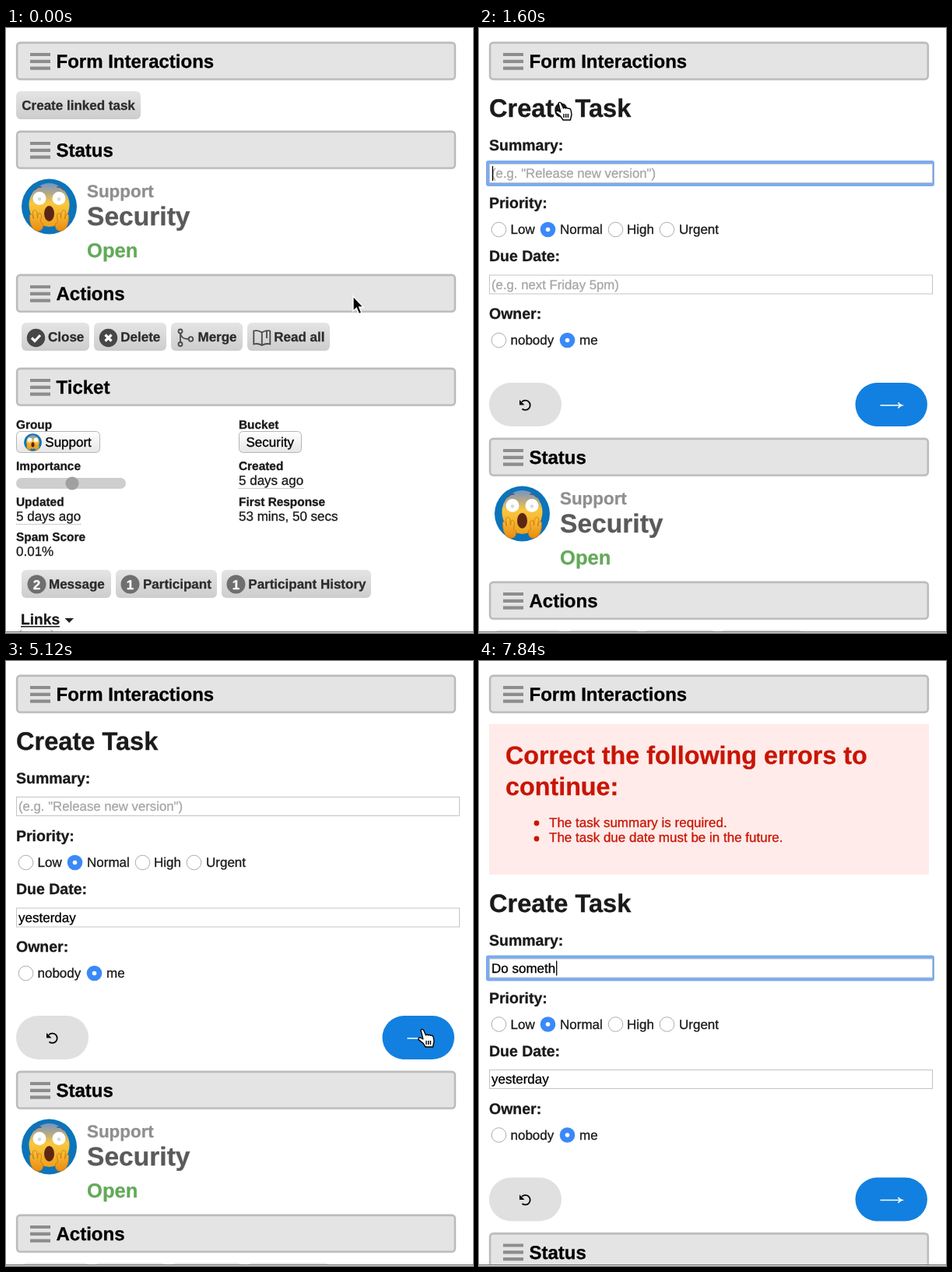
Write an HTML page that moves like this. It is 600x776 px and loops after 8 s.

```html
<!DOCTYPE html>
<html lang="en">
<head>
<meta charset="utf-8">
<title>Create a linked task</title>
<style>
  html, body { margin: 0; width: 100%; height: 100%; overflow: hidden; background: #fff; }
  svg { display: block; width: 600px; height: 776px; }
  text {
    font: 17px "Liberation Sans", Arial, sans-serif; white-space: pre;
    fill: currentColor; stroke: currentColor; stroke-width: .3px; text-rendering: geometricPrecision;
  }
  .b { font-weight: bold; }
  .field { fill: #fff; stroke: #c4c4c4; }
  .ring { fill: #7babf0; }
</style>
</head>
<body>
<svg id="stage" viewBox="0 0 600 776">
  <defs>
    <linearGradient id="gray" x2="0" y2="1"><stop stop-color="#e4e4e4"/><stop offset="1" stop-color="#cdcdcd"/></linearGradient>
    <linearGradient id="blue" x2="0" y2="1"><stop stop-color="#dceafd"/><stop offset="1" stop-color="#96c0fb"/></linearGradient>
    <linearGradient id="pill" x2="0" y2="1"><stop stop-color="#fff"/><stop offset="1" stop-color="#e6e6e6"/></linearGradient>
    <linearGradient id="skin" x2="0" y2="1">
      <stop stop-color="#7594c4"/><stop offset=".25" stop-color="#b9ab82"/>
      <stop offset=".45" stop-color="#f9c840"/><stop offset="1" stop-color="#f0a01c"/>
    </linearGradient>
    <linearGradient id="palm" x2="0" y2="1"><stop stop-color="#fbc33a"/><stop offset="1" stop-color="#e88b12"/></linearGradient>
    <g id="hand-half">
      <path d="M-25 13q0-4 3-3l2 6-1-10q3-3 5 1l1 8 1-6q4-1 4 3l-1 8 2 1q3 4-1 9-4 3-9 0-6-5-6-17z" fill="url(#palm)" stroke="#c9780f" stroke-width=".8"/>
      <circle cx="-12.5" cy="-10.5" r="8.5" fill="#fff"/>
      <circle cx="-12.5" cy="-9.5" r="2.2" fill="#d5d9dd"/>
      <path d="M-19-21q4-5 9-4" fill="none" stroke="#45608c" stroke-width="2"/>
    </g>
    <g id="face">
      <circle r="35.5" fill="#0b74ba"/>
      <ellipse cy="-2" rx="26" ry="28" fill="url(#skin)"/>
      <ellipse cy="9" rx="6.5" ry="10" fill="#5c2612"/>
      <use href="#hand-half"/>
      <use href="#hand-half" transform="scale(-1 1)"/>
    </g>
  </defs>
  <g id="rest"></g>
  <g id="link"></g>
  <g id="errors"></g>
  <g id="form"></g>
  <g id="top"></g>
  <path d="M0 774.5H600" stroke="#6e6e6e"/>
  <path d="M0 775.5H600" stroke="#ddd"/>
  <g id="cursor">
    <path id="arrow" d="M0 0V19L4.3 15.2 7.4 22.6 10.8 21.2 7.7 14H13.2Z" stroke="#fff" stroke-width="1.3"/>
    <g id="hand" transform="translate(-6 -2)" stroke="#000" stroke-width="1.4" stroke-linejoin="round">
      <path d="M4 2.6Q5 .4 7.3 2L10.5 9Q11.6 7.2 13.4 9 15 7.6 16.6 9.4 19 8.6 20 11L21 17 19.4 24H10L7 19.4 1 14.6Q.4 12 3 12L6.8 14Z" fill="#fff"/>
      <path d="M11 16V21M13.7 16V21M16.4 16V21" fill="none"/>
    </g>
    <path id="beam" d="M-3-9Q0-9 0-7 0-9 3-9M0-7V7M-3 9Q0 9 0 7 0 9 3 9" fill="none" stroke="#222" stroke-width="1.4"/>
  </g>
</svg>
<script>
const $ = id => document.getElementById(id);
const show = (id, on) => { $(id).style.display = on ? '' : 'none'; };

// ---- drawing helpers ----
const text = (x, y, s, { size = 17, color = '#1a1a1a', bold = false, extra = '' } = {}) =>
  `<text x="${x}" y="${y}" color="${color}" style="font-size:${size}px" class="${bold ? 'b' : ''}" ${extra}>${s}</text>`;
const bold = (x, y, s, size = 17, color = '#1a1a1a') => text(x, y, s, { size, color, bold: true });
const rect = (x, y, w, h, rx, attrs) => `<rect x="${x}" y="${y}" width="${w}" height="${h}" rx="${rx}" ${attrs}/>`;
const button = (x, y, w, label, labelX) =>
  rect(x, y, w, 36, 6, 'fill="url(#gray)"') + bold(labelX, y + 24, label, 17, '#2c2c2c');
const panel = (y, title) =>
  rect(12.5, y - 1, 566, 50.5, 6, 'fill="#e9e9e9"') +
  rect(14.2, y + 1, 562.6, 46.6, 4, 'fill="#e4e4e4" stroke="#bbb" stroke-width="2.4"') +
  `<path d="M31 ${y + 16}h26m-26 8.8h26m-26 8.8h26" stroke="#8d8d8d" stroke-width="4.2"/>` +
  bold(64.5, y + 33, title, 24, '#000');
const disc = (x, y, mark) =>
  `<circle cx="${x}" cy="${y}" r="11.7" fill="#474747"/>` +
  `<path transform="translate(${x} ${y})" d="${mark}" fill="none" stroke="#fff" stroke-width="3.2"/>`;
const count = (x, n) =>
  `<circle cx="${x}" cy="713.5" r="12" fill="#6f6f6f"/>` +
  text(x, 719.5, n, { color: '#fff', bold: true, extra: 'text-anchor="middle"' });
const tag = (x, w, label, labelX) =>
  rect(x, 517.5, w, 27, 5, 'fill="url(#pill)" stroke="#b5b5b5"') + text(labelX, 537, label, { color: '#000' });
const dotted = (x, y) => `<path d="M${x} ${y}h83" stroke="#999" stroke-dasharray="1 1"/>`;
const radio = (x, y, label, labelX, on) =>
  (on ? `<circle cx="${x}" cy="${y}" r="9.8" fill="#3a89f8"/><circle cx="${x}" cy="${y}" r="2.8" fill="#fff"/>`
      : `<circle cx="${x}" cy="${y}" r="9.3" fill="#fff" stroke="#adadad"/>`) + text(labelX, y + 5.5, label);
const field = (id, y, hint) =>
  rect(9, y - 4, 576, 33, 3, `class="ring" id="${id}Ring"`) +
  rect(13.5, y + .5, 569, 24, 0, 'class="field"') +
  text(16, y + 18, hint, { size: 16.75, color: '#a6a6a6', extra: `id="${id}Hint"` }) +
  text(16, y + 18, '', { color: '#000', extra: `id="${id}Text"` }) +
  `<path id="${id}Caret" d="M0 ${y + 3}v19" stroke="#000" stroke-width="1.3"/>`;

// ---- page ----
$('top').innerHTML = panel(18, 'Form Interactions');
$('link').innerHTML =
  rect(13, 81, 160, 36, 6, 'id="linkBox"') +
  text(20.3, 105, 'Create linked task', { bold: true, extra: 'id="linkText"' });

$('errors').innerHTML =
  rect(13, 81, 565, 193, 0, 'fill="#ffebe9"') +
  bold(34, 132, 'Correct the following errors to', 32.3, '#c81505') +
  bold(34, 172, 'continue:', 32.3, '#c81505') +
  ['The task summary is required.', 'The task due date must be in the future.'].map((s, i) =>
    `<circle cx="74" cy="${208 + 20 * i}" r="3.4" fill="#c81505"/>` +
    text(90, 212.5 + 19.5 * i, s, { color: '#c81505' })).join('');

$('form').innerHTML =
  bold(13, 114, 'Create Task', 32.6) +
  bold(13, 157, 'Summary:', 19.5) + field('summary', 174, '(e.g. "Release new version")') +
  bold(13, 231, 'Priority:', 19.5) +
  radio(25.5, 258.5, 'Low', 40.5) + radio(88.5, 258.5, 'Normal', 104, true) +
  radio(175.5, 258.5, 'High', 190) + radio(241.5, 258.5, 'Urgent', 257) +
  bold(13, 299, 'Due Date:', 19.5) + field('due', 316.5, '(e.g. next Friday 5pm)') +
  bold(13, 373, 'Owner:', 19.5) +
  radio(25.5, 400.5, 'nobody', 40.5) + radio(113.5, 400.5, 'me', 129, true) +
  rect(13, 455, 93, 56, 28, 'fill="#e0e0e0"') +
  rect(483.5, 455, 92.5, 56, 28, 'fill="#1280e0"') +
  `<path d="M55 479.5A6.2 6.2 0 1 1 55.5 488.5" fill="none" stroke="#000" stroke-width="1.8"/>
   <path d="M52 477V483.5H58.5Z"/>
   <path d="M515.5 484H543M538.5 480.5Q540 483 543.5 484 540 485 538.5 487.5" fill="none" stroke="#fff" stroke-width="1.5"/>`;

$('rest').innerHTML =
  panel(132, 'Status') +
  '<use href="#face" transform="translate(55.5 229)"/>' +
  bold(104, 217, 'Support', 22.4, '#8f8f8f') +
  bold(104, 253, 'Security', 33.6, '#5a5a5a') +
  bold(104, 294, 'Open', 25.6, '#63a95a') +
  panel(316, 'Actions') +
  button(20, 378, 87, 'Close', 54) + button(113, 378, 93, 'Delete', 147.3) +
  button(212, 378, 92, 'Merge', 246.5) + button(310, 378, 106, 'Read all', 344.3) +
  disc(38.5, 397.5, 'M-5.5 0L-1.5 4 5.5-3.5') + disc(131.5, 397.5, 'M-4-4L4 4M4-4L-4 4') +
  `<g fill="none" stroke="#4a4a4a" stroke-width="1.8">
     <path d="M224 391.5V403M224 391.5Q225 399 234.5 399"/>
     <circle cx="224" cy="389" r="2.5"/><circle cx="224" cy="405.5" r="2.5"/><circle cx="237.5" cy="399" r="2.8"/>
     <path d="M328.8 390.5Q324 387 318.3 388.5V405.5Q324 404 328.8 407 334 404 339.3 405.5V388.5Q334 387 328.8 390.5V407"/>
     <path d="M335 388V398"/>
   </g>` +
  panel(436, 'Ticket') +
  [[13, 514, 'Group'], [299, 514, 'Bucket'], [13, 567, 'Importance'], [299, 567, 'Created'],
   [13, 613, 'Updated'], [299, 613, 'First Response'], [13, 658, 'Spam Score']]
    .map(([x, y, s]) => bold(x, y, s, 15.4)).join('') +
  tag(13.5, 107, 'Support', 50.3) + tag(299.5, 80, 'Security', 308.5) +
  '<use href="#face" transform="translate(34.5 531.5) scale(.32)"/>' +
  rect(13, 577, 141, 14, 7, 'fill="#cecece"') + '<circle cx="85" cy="584" r="8.6" fill="#a0a0a0"/>' +
  text(299, 585.5, '5 days ago') + dotted(299, 590.5) +
  text(13, 631.5, '5 days ago') + dotted(13, 636.5) +
  text(299, 631.5, '53 mins, 50 secs') + text(13, 676.5, '0.01%') +
  button(20, 695, 115, 'Message', 55) + button(141, 695, 130, 'Participant', 176) +
  button(277, 695, 192, 'Participant History', 311.3) +
  count(39.5, 2) + count(159.5, 1) + count(295.5, 1) +
  bold(19, 765, 'Links', 19.2) +
  '<path d="M19 767.8H69" stroke="#1a1a1a" stroke-width="1.6"/><path d="M75.5 757H87L81.2 763Z" fill="#222"/>' +
  text(15, 783.5, '(none)', { color: '#aaa', size: 16.5 });

// ---- timeline ----
const LOOP = 8000, STEP = 160;
const OPEN = 1600, TO_DUE = 2720, PRESS = 5120, FAIL = 5280;
const typing = {
  due: { word: 'yesterday', start: 3360, pace: 100 },
  summary: { word: 'Do someth', start: 7200, pace: 80 },
};
const LINK = [104, 96], DUE = [130, 329], SEND = [535, 473];

const glide = (t, t0, t1, a, b) => {
  const u = Math.min(1, Math.max(0, (t - t0) / (t1 - t0))), e = u * u * (3 - 2 * u);
  return a.map((v, i) => v + (b[i] - v) * e);
};

function pointer(t) {
  if (t < OPEN + STEP) {
    const p = glide(t, 160, 1120, [446, 344], LINK);
    return { p, kind: p[0] < 173 && p[1] < 117 ? 'hand' : 'arrow' };
  }
  if (t < typing.due.start) return { p: glide(t, 1920, 2560, LINK, DUE), kind: 'beam' };
  if (t < 4320) return null;
  if (t < FAIL + STEP) {
    const p = glide(t, 4320, 4960, DUE, SEND);
    return { p, kind: p[0] > 484 && p[1] > 455 ? 'hand' : 'arrow' };
  }
  return t < typing.summary.start ? { p: SEND, kind: 'arrow' } : null;
}

function drawField(id, t, focusAt) {
  const { word, start, pace } = typing[id];
  const n = t < start ? 0 : Math.min(word.length, Math.floor((t - start) / pace) + 1);
  const label = $(id + 'Text'), focused = focusAt !== null;
  label.textContent = word.slice(0, n);
  show(id + 'Hint', n === 0);
  show(id + 'Ring', focused);
  const since = n ? start + (n - 1) * pace : focusAt;
  const caretOn = focused && (t - since) % 1000 < 500;
  show(id + 'Caret', caretOn);
  if (caretOn) $(id + 'Caret').setAttribute('transform', `translate(${17.5 + (n ? label.getComputedTextLength() : 0)} 0)`);
}

function draw(now) {
  const t = Math.floor(now % LOOP / STEP) * STEP;
  const open = t >= OPEN, failed = t >= FAIL;
  show('link', !open);
  show('form', open);
  show('errors', failed);
  $('form').setAttribute('transform', `translate(0 ${failed ? 207.5 : 0})`);
  $('rest').setAttribute('transform', `translate(0 ${failed ? 601.5 : open ? 394 : 0})`);
  if (open) {
    drawField('summary', t, failed ? FAIL : t < TO_DUE ? OPEN : null);
    drawField('due', t, t >= TO_DUE && t < PRESS ? TO_DUE : null);
  }

  const c = pointer(t), hover = !open && c.kind === 'hand';
  $('linkBox').setAttribute('fill', hover ? 'url(#blue)' : 'url(#gray)');
  $('linkText').setAttribute('color', hover ? '#2a80d8' : '#2c2c2c');
  show('cursor', c);
  if (c) {
    $('cursor').setAttribute('transform', `translate(${c.p})`);
    for (const kind of ['arrow', 'hand', 'beam']) show(kind, kind === c.kind);
  }
}

const begin = performance.now();
(function tick() {
  draw(performance.now() - begin);
  requestAnimationFrame(tick);
})();
</script>
</body>
</html>
```
